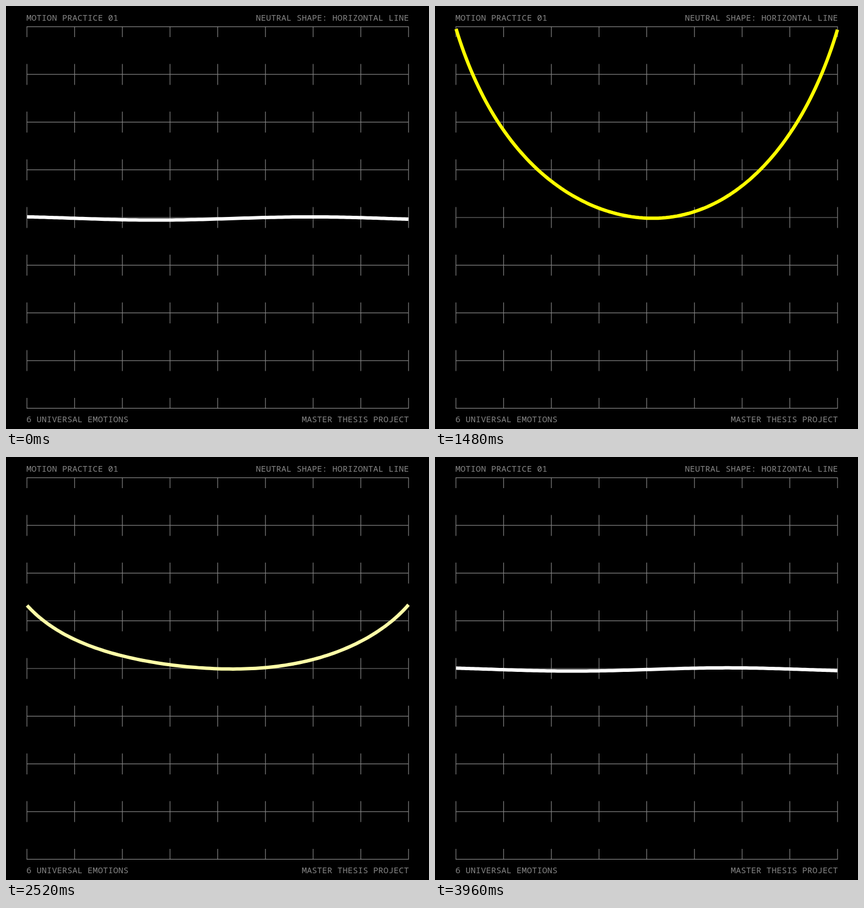
These frames come from a looping animation (748 px wide and 748 px high, 4 s). An HTML page:

```html
<!DOCTYPE html>
<html lang="en">
<head>
<meta charset="utf-8">
<title>Motion practice</title>
<style>
  html, body { margin: 0; height: 100%; overflow: hidden; background: #000; }
  svg { display: block; width: 100vw; height: 100vh; }
  text { font: 15.05px "Noto Sans Mono", monospace; fill: #858585; }
  .end { text-anchor: end; }
  #grid { stroke: #808080; stroke-width: 1.2; }
  #curve { fill: none; stroke-width: 6; stroke-linejoin: round; }
</style>
</head>
<body>
<svg viewBox="0 0 748 748">
  <text x="36" y="26">MOTION PRACTICE 01</text>
  <text x="712.5" y="26" class="end">NEUTRAL SHAPE: HORIZONTAL LINE</text>
  <text x="36" y="735.5">6 UNIVERSAL EMOTIONS</text>
  <text x="712.5" y="735.5" class="end">MASTER THESIS PROJECT</text>
  <path id="grid"/>
  <path id="curve"/>
</svg>
<script>
const LOOP = 4000, STEP = 40;
const LEFT = 37, TOP = 36.6, CELL = 84.35, CELLS = 8, TICK = 18.5;
const CENTER = 374.5, HALF = 337.2, BASE = 375.7, RISE = 335;
const WAVE = { height: 3, length: 560, start: 262, period: 1000 };

const clamp = v => Math.min(1, Math.max(0, v));

function gridPath() {
  const size = CELL * CELLS;
  let d = '';
  for (let row = 0; row <= CELLS; row++) {
    const y = TOP + row * CELL;
    const from = Math.max(TOP, y - TICK), to = Math.min(TOP + size, y + TICK);
    d += `M${LEFT - 0.6} ${y}h${size + 1.2}`;
    for (let col = 0; col <= CELLS; col++) d += `M${LEFT + col * CELL} ${from}V${to}`;
  }
  return d;
}

// Quick rise, hold, then a slow linear return to the flat line.
const smileAt = t => Math.min(clamp(t / 200), clamp((3000 - t) / 1400));

function curvePath(t, smile) {
  const crest = WAVE.start + WAVE.length * t / WAVE.period;
  const points = [];
  for (let i = -60; i <= 60; i++) {
    const s = i / 60;
    // A symmetric cubic Bezier bowl, which eases into an even straight line.
    const u = s * (1 + 0.2 * (1 - s * s));
    const x = CENTER + HALF * u;
    const wave = WAVE.height * Math.cos((x - crest) / WAVE.length * 2 * Math.PI);
    const tilt = (0.4 + 2 * smile) * u;
    points.push(`${x.toFixed(2)} ${(BASE - RISE * smile * s * s + tilt + wave).toFixed(2)}`);
  }
  return 'M' + points.join('L');
}

const curve = document.getElementById('curve');
document.getElementById('grid').setAttribute('d', gridPath());

function draw(now) {
  const t = Math.floor(now % LOOP / STEP) * STEP;
  const smile = smileAt(t);
  curve.setAttribute('d', curvePath(t, smile));
  curve.setAttribute('stroke', `rgb(255, 255, ${Math.round(255 * (1 - smile))})`);
  requestAnimationFrame(draw);
}
draw(performance.now());
</script>
</body>
</html>
```
